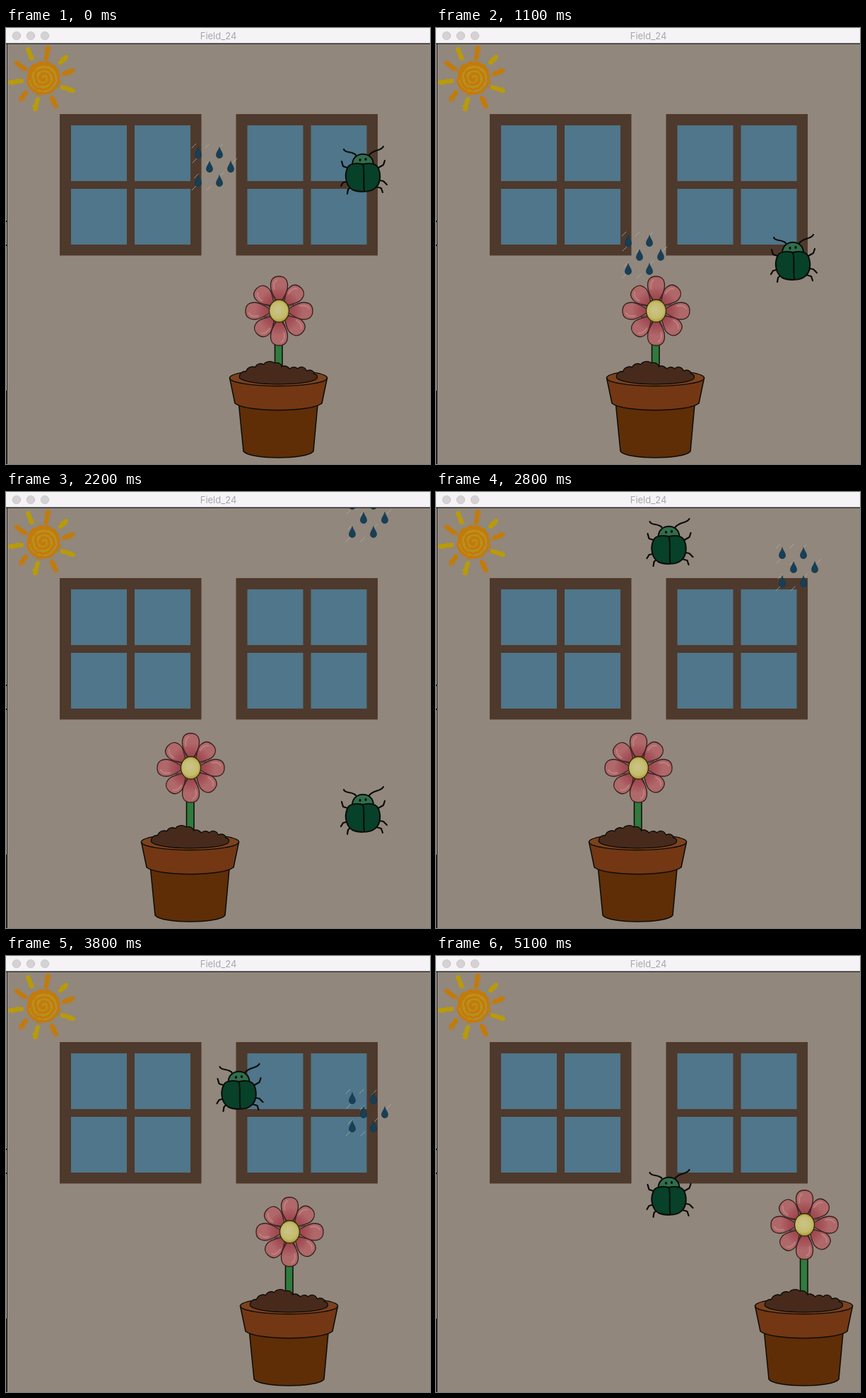
An HTML page with a canvas that plays this animation: 600 px wide and 618 px high, repeating every 5200 ms.

```html
<!DOCTYPE html>
<html lang="en">
<head>
<meta charset="utf-8">
<title>Field_24</title>
<style>
html, body { margin: 0; width: 100%; height: 100%; overflow: hidden; background: #91877c; }
canvas { display: block; }
</style>
</head>
<body>
<canvas id="stage" width="600" height="618"></canvas>
<script>
const ctx = document.getElementById('stage').getContext('2d');
const LOOP = 5200, STEP_MS = 100, TICKS_PER_STEP = 2.295, STEP_PX = 5;
const INK = '#0b0b08';

const clamp = (v, lo, hi) => Math.min(hi, Math.max(lo, v));

function rect(x, y, w, h, color) {
  ctx.fillStyle = color;
  ctx.fillRect(x, y, w, h);
}

function paint(path, fill, stroke, width = 1.5) {
  if (fill) { ctx.fillStyle = fill; ctx.fill(path); }
  if (stroke) { ctx.strokeStyle = stroke; ctx.lineWidth = width; ctx.stroke(path); }
}

function ellipse(x, y, rx, ry, fill, stroke, width) {
  const p = new Path2D();
  p.ellipse(x, y, rx, ry, 0, 0, Math.PI * 2);
  paint(p, fill, stroke, width);
}

function shape(d, fill, stroke, width) {
  paint(new Path2D(d), fill, stroke, width);
}

function at(x, y, draw) {
  ctx.save();
  ctx.translate(x, y);
  draw();
  ctx.restore();
}

function seeded(seed) {
  return () => (seed = (seed * 16807) % 2147483647) / 2147483647;
}

function drawWindow(x) {
  rect(x, 122, 200.5, 200.5, '#4e392d');
  for (const dx of [16, 106])
    for (const y of [138, 228]) rect(x + dx, y, 79, 79, '#4f768a');
}

// A crayon stroke: a solid core with ragged edges.
function crayon(x1, y1, x2, y2, color, random) {
  shape(`M${x1} ${y1}L${x2} ${y2}`, null, color, 6);
  for (let i = 0; i < 22; i++) {
    const t = random();
    rect(x1 + (x2 - x1) * t + random() * 8 - 4.5,
         y1 + (y2 - y1) * t + random() * 8 - 4.5, 1.5, 1.5, color);
  }
}

function drawSun() {
  const random = seeded(13), gold = '#b99b09', orange = '#c27b0c';
  const rays = [
    [31, 30, 36, 43], [59, 28, 57, 43], [85, 41, 77, 49], [94, 60, 82, 65], [80, 84, 95, 89],
    [65, 99, 71, 111], [45, 101, 41, 115], [28, 92, 21, 101], [22, 75, 6, 77], [27, 58, 15, 50]
  ];
  rays.forEach((r, i) => crayon(...r, i % 2 ? orange : gold, random));
  ellipse(52, 71, 20, 20, '#b9921d');
  ctx.strokeStyle = orange;
  ctx.lineWidth = 3.5;
  ctx.beginPath();
  for (let a = 0; a < Math.PI * 8; a += 0.12) {
    const r = Math.min(21.5, 1 + a * 1.05) + random() * 2 - 0.6;
    ctx.lineTo(53 + r * Math.cos(a), 71 + r * Math.sin(a));
  }
  ctx.stroke();
  for (let i = 0; i < 45; i++) {
    const a = random() * Math.PI * 2, r = 20 + random() * 5;
    rect(52 + r * Math.cos(a), 71 + r * Math.sin(a), 2, 2, orange);
  }
}

function drawRain() {
  const streaks = [[-6, -10], [13, -10], [31, -9], [-5, 11], [14, 13], [52, 11], [33, 31], [-3, 33], [15, 50], [-6, 50]];
  for (const [x, y] of streaks)
    shape(`M${x - 3} ${y + 3}L${x + 3} ${y - 3}`, null, 'rgba(184,178,172,.7)', 1);
  for (let row = 0; row < 3; row++)
    for (let col = 0; col < 2; col++)
      at(col * 30 + (row === 1 ? 16 : 0), row * 20, () =>
        shape('M0-8C1-4 4.5-1 4.5 3C4.5 9-4.5 9-4.5 3C-4.5-1-1-4 0-8Z', '#173f57', '#12354a', 0.7));
}

// Origin: centre of the wing cases.
function drawBug() {
  shape('M-10-31C-15-37-25-33-27-39M9-31C15-39 25-36 29-43' +
        'M-22-13L-28-15L-30-22M-24 7L-28 8L-31 13M-18 15L-21 18L-22 24' +
        'M22-13L29-17L31-23M24 5L29 6L34 11M19 14L26 16L28 22', null, INK, 2.2);
  shape('M-15-18C-14-37 14-37 15-18Z', '#2f6e4d', INK, 2);
  ellipse(-4, -24, 1.6, 2, INK);
  ellipse(4, -25, 1.6, 2, INK);
  shape('M0-18C-10-20-20-19-22-12C-27 0-23 13-15 18C-7 22 9 22 16 17' +
        'C25 11 26-2 22-12C19-19 10-20 0-18Z', '#07412a', INK, 2);
  shape('M0-18C3-7 0 8 2 20', null, INK, 2);
}

function drawPetal(angle, length) {
  ctx.save();
  ctx.rotate(angle);
  const shade = ctx.createRadialGradient(0, 0, 10, 0, 0, length);
  shade.addColorStop(0, '#963b43');
  shade.addColorStop(0.4, '#a6545a');
  shade.addColorStop(0.65, '#b0686a');
  shade.addColorStop(1, '#b06768');
  const l = length;
  shape(`M8 0C18-5 25-12 ${l - 13}-12C${l - 3}-12 ${l}-6 ${l} 0C${l} 6 ${l - 3} 12 ${l - 13} 12C25 12 18 5 8 0Z`,
        shade, '#35201d', 1.3);
  shape(`M${l - 18}-7Q${l - 8}-9 ${l - 5}-3`, null, 'rgba(203,148,146,.55)', 2);
  ctx.restore();
}

function drawHead() {
  for (const a of [-47, 43, 133, 225]) drawPetal(a * Math.PI / 180, 45);
  for (const a of [-90, 0, 90, 180]) drawPetal(a * Math.PI / 180, a % 180 ? 49 : 47.5);
  for (let i = 0; i < 8; i++) {
    const a = (i + 0.5) * Math.PI / 4, c = Math.cos(a), s = Math.sin(a);
    shape(`M${c * 13} ${s * 15}L${c * 23} ${s * 24}`, null, '#54242a', 1.2);
  }
  const glow = ctx.createRadialGradient(-2, -2, 3, 0, 0, 16);
  glow.addColorStop(0, '#c9c285');
  glow.addColorStop(0.65, '#c4bb69');
  glow.addColorStop(1, '#a2952e');
  ellipse(0, 0, 14, 16, glow, '#33280f', 1.3);
}

// Origin: middle of the pot; growth lifts the flower head.
function drawPlant(growth) {
  shape('M-56 534L-49.5 600C-40 612 40 612 49.5 600L55.5 534Z', '#5f2e06', INK);
  shape('M-69 496L-61.5 532C-45 545 45 545 61.5 532L69 496Z', '#733714', INK);
  ellipse(0, 496, 69, 11.5, '#7c421e', INK);
  rect(-5, 440 - growth, 10.5, 42 + growth, '#307b3d');
  shape(`M-5 ${440 - growth}V482M5.5 ${440 - growth}V482`, null, INK, 1.5);
  shape('M-55 496C-56 489-50 486-46 487C-44 480-36 479-33 481C-30 475-24 475-21 477' +
        'C-17 471-8 472-6 475C0 473 4 476 5 480C10 477 14 481 16 483C20 479 26 481 27 483' +
        'C32 478 38 481 40 486C47 483 51 488 50 490C56 491 56 496 53 498C40 507-42 508-55 496Z',
        '#472a1c', INK, 1.3);
  at(1, 401 - growth, drawHead);
}

function drawTitleBar() {
  rect(0, 0, 600, 22, '#f6f3f7');
  rect(0, 21.5, 600, 1.3, '#17161a');
  for (const x of [15, 35, 55]) ellipse(x, 11, 5.8, 5.8, '#d4d2d5', '#c5c3c6', 0.8);
  ctx.fillStyle = '#a8a6aa';
  ctx.font = '13px Inter, Roboto, sans-serif';
  ctx.textAlign = 'center';
  ctx.fillText('Field_24', 300.5, 16);
}

function drawEdges() {
  rect(0, 22, 1, 596, '#b3aeaa');
  rect(1, 22, 1, 596, '#1b1918');
  rect(0, 273, 1, 2, INK);
  rect(0, 307, 1, 2, INK);
  rect(0, 514, 1, 104, '#2a2a2d');
}

function plantX(n) {
  const left = clamp(n - 5, 0, 15) + clamp(n - 30, 0, 10);
  const right = clamp(n - 59, 0, 52);
  return 385.5 + STEP_PX * (right - left);
}

function render(time) {
  const step = Math.floor((time % LOOP) / STEP_MS);
  const n = Math.floor(step * TICKS_PER_STEP);
  const fall = n * STEP_PX;
  const catches = (step >= 15) + (step >= 50);
  const bugReset = step >= 23;

  rect(0, 0, 600, 618, '#91877c');
  drawWindow(76);
  drawWindow(325.5);
  drawSun();
  at(plantX(n), 0, () => drawPlant(catches * 10));
  at(catches ? 490 : 272, 177 + fall - 410 * catches, drawRain);
  at(bugReset ? 329.5 : 505, 211 + fall - (bugReset ? 450 : 0), drawBug);
  drawEdges();
  drawTitleBar();
}

function loop() {
  render(performance.now());
  requestAnimationFrame(loop);
}

ctx.lineCap = ctx.lineJoin = 'round';
loop();
</script>
</body>
</html>
```
